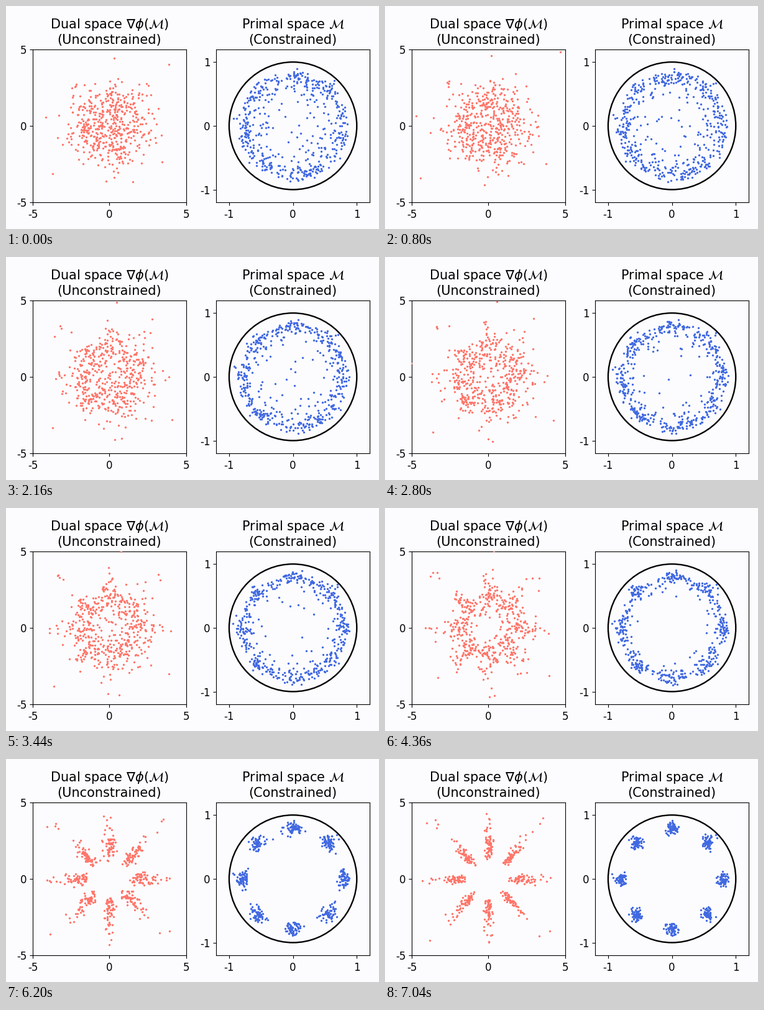
Write a matplotlib script that moves like this. It is 600 by 359 pixels and loops after 7080 ms.

```python
import numpy as np
import matplotlib.pyplot as plt
from matplotlib.animation import FuncAnimation

plt.rcParams.update({"font.family": "DejaVu Sans", "font.size": 12,
                     "axes.unicode_minus": False, "xtick.major.pad": 4})

W, H, DPI = 600, 359, 100
SIDE, BOTTOM = 246.4, 42.9
FRAMES, STEP = 177, 40
N, CLUSTERS = 500, 8
PAPER = "#fcfcfe"
rng = np.random.default_rng(12)


def to_dual(x):
    return x / (1 - (x ** 2).sum(-1, keepdims=True))


def to_primal(y):
    return 2 * y / (1 + np.sqrt(1 + 4 * (y ** 2).sum(-1, keepdims=True)))


def sample_data():
    """Eight tight blobs near the rim of the unit disc, as dual points."""
    a = 2 * np.pi * (np.arange(N) % CLUSTERS) / CLUSTERS
    center = 0.795 * np.column_stack([np.cos(a), np.sin(a)])
    return to_dual(center + rng.normal(0, 0.049, (N, 2)))


def diffuse(y):
    """Noise the data step by step and store the path in reverse."""
    s = np.linspace(0, 1, FRAMES)
    signal = np.exp(-(0.1 * s + 0.68 * s ** 2))
    path = [y]
    for keep in signal[1:] / signal[:-1]:
        y = np.sqrt(keep) * y + np.sqrt(1 - keep) * rng.normal(size=y.shape)
        path.append(y)
    return np.array(path[::-1])


def panel(left, limit, ticks, title, color):
    ax = fig.add_axes([left / W, BOTTOM / H, SIDE / W, SIDE / H])
    ax.set(xlim=(-limit, limit), ylim=(-limit, limit),
           xticks=ticks, yticks=ticks, facecolor=PAPER)
    ax.set_title(title, fontsize=15)
    dots = ax.scatter(np.zeros(N), np.zeros(N), s=5.8, color=color,
                      linewidths=0, zorder=3)
    return ax, dots


dual = diffuse(sample_data())
primal = to_primal(dual)

fig = plt.figure(figsize=(W / DPI, H / DPI), dpi=DPI, facecolor=PAPER)
_, dual_dots = panel(43.2, 5, [-5, 0, 5],
                     "Dual space $\\nabla\\phi(\\mathcal{M})$\n(Unconstrained)",
                     "#ff766a")
ax, primal_dots = panel(338.4, 1.2, [-1, 0, 1],
                        "Primal space $\\mathcal{M}$\n(Constrained)",
                        "royalblue")
ax.add_patch(plt.Circle((0, 0), 1, fill=False, lw=1.7, ec="black"))


def draw(i):
    dual_dots.set_offsets(dual[i])
    primal_dots.set_offsets(primal[i])
    return dual_dots, primal_dots


ani = FuncAnimation(fig, draw, frames=FRAMES, interval=STEP,
                    repeat=True, repeat_delay=0)
plt.show()
```
